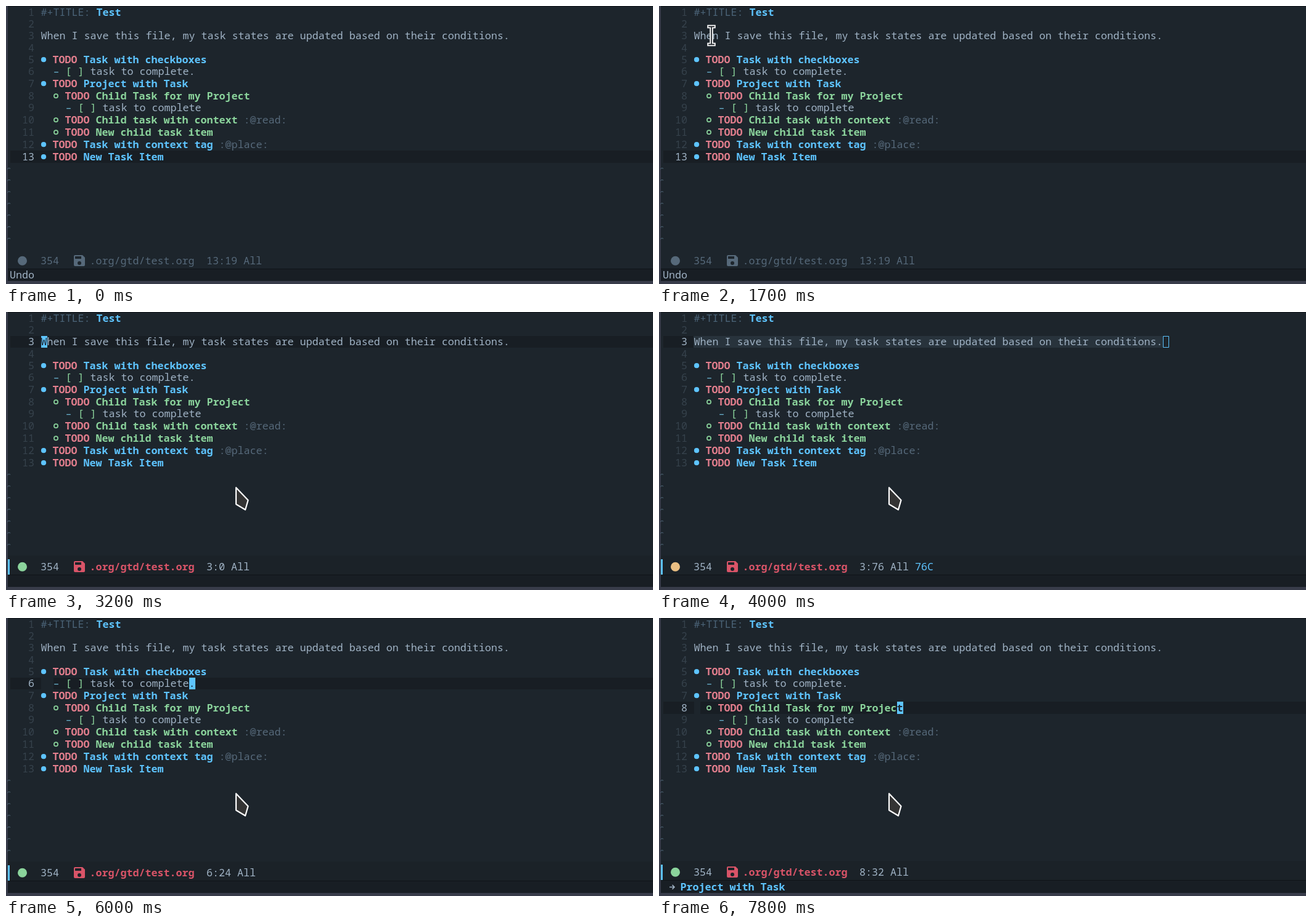
These frames come from a looping animation (1049x452 px, 8000 ms). An HTML page with a canvas:

```html
<!DOCTYPE html>
<html lang="en">
<head>
<meta charset="utf-8">
<title>Task states</title>
<style>
html, body { margin: 0; width: 100%; height: 100%; overflow: hidden; background: #1d252c; }
canvas { display: block; }
</style>
</head>
<body>
<canvas id="stage" width="1049" height="452"></canvas>
<script>
const ctx = document.getElementById('stage').getContext('2d');
const LOOP = 8000, CELL = 10, LEFT = 56.4;
const BG = '#1d252c', DARK = '#181e24', FG = '#a0b3c5', DIM = '#36424c', GREY = '#56697a',
  BLUE = '#5ec4ff', GREEN = '#8bd49c', PINK = '#e27e8d', RED = '#d95468', ORANGE = '#ebbf83',
  SELECT = '#28333c', FRAME = '#383c4a';

// Each row: baseline, then runs of [text, colour, bold]
const todo = ['TODO ', PINK, true];
const top1 = (y, text, tag = '') => [y, ['● ', BLUE], todo, [text, BLUE, true], [tag, GREY]];
const sub = (y, text, tag = '') => [y, ['  ○ ', GREEN], todo, [text, GREEN, true], [tag, GREY]];
const check = (y, indent, text) => [y, [indent + '– ', '#6ab4d0'], ['[ ] ', GREEN], [text, FG]];
const rows = [
  [16, ['#+TITLE: ', '#4b6478'], ['Test', BLUE, true]],
  [35],
  [54, ['When I save this file, my task states are updated based on their conditions.', FG]],
  [74],
  top1(93, 'Task with checkboxes'),
  check(112, '  ', 'task to complete.'),
  top1(132, 'Project with Task'),
  sub(152, 'Child Task for my Project'),
  check(171, '    ', 'task to complete'),
  sub(191, 'Child task with context', ' :@read:'),
  sub(211, 'New child task item'),
  top1(231, 'Task with context tag', ' :@place:'),
  top1(251, 'New Task Item')
].map(([y, ...runs]) => {
  // Bulleted rows are one pixel taller and sit slightly to the left
  const bullet = runs.includes(todo) ? 1 : 0;
  return {
    y,
    x: LEFT - bullet * .8,
    top: y - 15 - bullet,
    h: 19 + bullet,
    cells: runs.flatMap(([text, color, bold]) => [...text].map(ch => ({ ch, color, bold })))
  };
});

// [start, line, cursor column, position label, mode, echo]
const states = [
  [0, 13, 0, '13:19', 'off', 'Undo'],
  [2000, 2, 0, '2:0', 'normal'],
  [3200, 3, 0, '3:0', 'normal'],
  [3600, 3, 0, '3:0', 'visual', 'Mark set'],
  [4000, 3, 76, '3:76', 'visual'],
  [5200, 3, 75, '3:75', 'normal'],
  [5600, 4, 0, '4:0', 'normal'],
  [5800, 5, 26, '5:26', 'normal'],
  [6000, 6, 24, '6:24', 'normal'],
  [6100, 7, 23, '7:23', 'normal'],
  [6700, 3, 75, '3:75', 'normal', 'path'],
  [6900, 4, 0, '4:0', 'normal', 'path'],
  [7100, 5, 26, '5:26', 'normal', 'path'],
  [7300, 6, 24, '6:24', 'normal', 'path'],
  [7500, 7, 23, '7:23', 'normal', 'path'],
  [7800, 8, 33, '8:32', 'normal', 'path']
];

function rect(x, y, w, h, color) {
  ctx.fillStyle = color;
  ctx.fillRect(x, y, w, h);
}

function dot(x, y, r, color) {
  ctx.fillStyle = color;
  ctx.beginPath();
  ctx.arc(x, y, r, 0, 7);
  ctx.fill();
}

function line(d, width, color) {
  ctx.lineWidth = width;
  ctx.strokeStyle = color;
  ctx.stroke(new Path2D(d));
}

function glyph(ch, x, y, color, bold) {
  if (ch === '●') return dot(x + 5.4, y - 5.8, 4.1, color);
  if (ch === '○') {
    ctx.strokeStyle = color;
    ctx.lineWidth = 1.7;
    ctx.beginPath();
    ctx.arc(x + 5.4, y - 5.8, 3.1, 0, 7);
    ctx.stroke();
    return;
  }
  ctx.font = (bold ? 'bold ' : '') + '16.667px "Noto Sans Mono", "DejaVu Sans Mono", monospace';
  ctx.fillStyle = color;
  ctx.fillText(ch, x, y);
}

function write(text, x, y, color, bold) {
  [...text].forEach((ch, i) => glyph(ch, x + i * CELL, y, color, bold));
}

function disk(x, y, color, hole) {
  ctx.save();
  ctx.translate(x, y);
  ctx.fillStyle = color;
  ctx.fill(new Path2D('M2 0H14L18 4V16Q18 18 16 18H2Q0 18 0 16V2Q0 0 2 0Z'));
  rect(2, 2, 10, 4, hole);
  dot(9, 13, 3, hole);
  ctx.restore();
}

function drawText(current, col, mode) {
  const row = rows[current - 1], { top, h } = row;
  const x = row.x + col * CELL, box = Math.round(x + .2);
  rect(7, top, mode === 'visual' ? 49 : 1042, h, DARK);
  if (mode === 'visual') rect(56, top, Math.max(col, 1) * CELL + .5, h, SELECT);
  if (current === 8) rect(57, top, 10, h, BG);
  if (current === 6) rect(57, top, 20, h, BG);

  rows.forEach((r, i) => {
    const n = String(i + 1);
    write(n, 46 - n.length * CELL, r.y, i + 1 === current ? FG : DIM);
    r.cells.forEach((c, k) => glyph(c.ch, r.x + k * CELL, r.y, c.color, c.bold));
  });

  if (mode === 'normal') {
    rect(box, top, CELL, h, BLUE);
    const c = row.cells[col];
    if (c) glyph(c.ch, x, row.y, BG, c.bold);
  } else if (mode === 'visual') {
    ctx.strokeStyle = BLUE;
    ctx.lineWidth = 1;
    ctx.strokeRect(box + .5, top + .5, CELL - 1, h - 1);
  }
}

function drawStatus(pos, col, mode, echo) {
  const on = mode !== 'off', lift = echo === 'path' ? 1 : 0, y = 420 - lift;
  const bar = on ? '#1b2228' : BG, fg = on ? FG : GREY, file = on ? RED : GREY;
  rect(3, 396 - lift, 1046, 31, bar);
  rect(3, 427 - lift, 1046, 1, '#0f1418');
  rect(3, 428 - lift, 1046, 19 + lift, DARK);
  if (on) rect(3, 402 - lift, 3, 25, BLUE);
  dot(26.5, y - 5.8, 7.5, { off: GREY, normal: GREEN, visual: ORANGE }[mode]);
  write('354', 56, y, fg);
  disk(110, y - 15, file, bar);
  write('.org/gtd/test.org', 135.5, y, file, on);
  write(pos + ' All', 325, y, fg);
  if (mode === 'visual') write(Math.max(col, 1) + 'C', 325 + (pos.length + 5) * CELL, y, BLUE);

  if (echo === 'path') {
    line('M17 437.5H25M21.5 434L25 437.5L21.5 441', 1.7, FG);
    write('Project with Task', 34.5, 443, BLUE, true);
  } else if (echo) write(echo, 6, 443, FG);
}

function drawFrame() {
  rect(3, 0, 1046, 1, '#10151a');
  rect(0, 0, 3, 452, FRAME);
  rect(0, 447, 1049, 5, FRAME);
  for (let y = 264; y < 380; y += 19) line(`M2.5 ${y + 1.5}Q4 ${y - 2} 7 ${y + .5}`, 1.1, '#4b6070');
}

function drawBeam(x, y) {
  const path = 'M-4-14.5H4M0-14.5V14.5M-4 14.5H4';
  ctx.save();
  ctx.translate(x, y);
  ctx.lineCap = 'square';
  line(path, 5.4, '#fff');
  line(path, 1.8, '#24292e');
  ctx.restore();
}

function drawPointer(t) {
  const step = Math.floor(t / 100) * 100;
  if (step < 1100) return;
  if (step < 2000) {
    const p = (step - 1100) / 800;
    drawBeam(115 - 59 * p ** 2.35, 41 + 112 * (1 - p) ** 2);
  } else if (step < 2300) {
    const p = (step - 1900) / 400;
    drawBeam(56 + 323 * p, 41 + 259 * p);
  } else {
    const path = 'M373 285.5V312.5L388 321.5L392.5 306Z';
    ctx.fillStyle = '#343434';
    ctx.fill(new Path2D(path));
    ctx.lineJoin = 'round';
    line(path, 2.2, '#fff');
  }
}

const origin = performance.now();
function draw() {
  const t = (performance.now() - origin) % LOOP;
  const [, current, col, pos, mode, echo] = states.findLast(s => s[0] <= t);
  rect(0, 0, 1049, 452, BG);
  drawText(current, col, mode);
  drawStatus(pos, col, mode, echo);
  drawFrame();
  drawPointer(t);
  requestAnimationFrame(draw);
}
draw();
</script>
</body>
</html>
```
